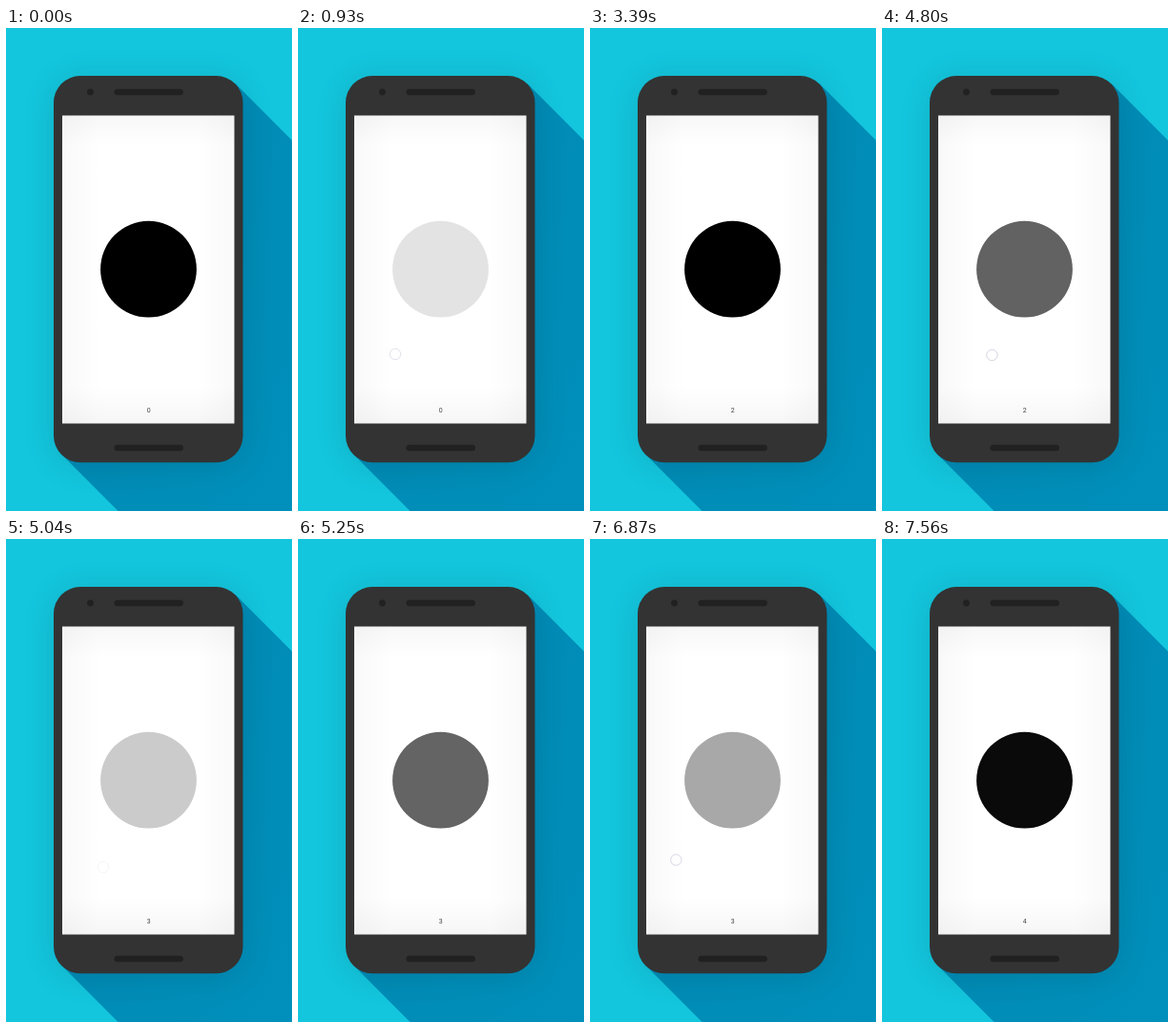
Recreate the animation shown at these times as an HTML page. Size 300x505 px, loop 8.22 s.

```html
<!DOCTYPE html>
<html lang="en">
<head>
<meta charset="utf-8">
<style>
html, body { margin: 0; width: 100%; height: 100%; overflow: hidden; background: #13c6dd; }
svg { display: block; width: 300px; height: 505px; }
text { font: 7px Roboto, sans-serif; text-anchor: middle; fill: #444; }
</style>
</head>
<body>
<svg viewBox="0 0 300 505">
  <defs>
    <linearGradient id="shade" x1="0" y1="0" x2="1" y2="1">
      <stop offset="0" stop-color="#0088b2"/><stop offset="1" stop-color="#0090bb"/>
    </linearGradient>
    <linearGradient id="side">
      <stop offset="0" stop-opacity=".025"/><stop offset=".22" stop-opacity="0"/>
      <stop offset=".78" stop-opacity="0"/><stop offset="1" stop-opacity=".025"/>
    </linearGradient>
    <linearGradient id="ends" x2="0" y2="1">
      <stop offset="0" stop-opacity=".03"/><stop offset=".1" stop-opacity="0"/>
      <stop offset=".88" stop-opacity="0"/><stop offset="1" stop-opacity=".035"/>
    </linearGradient>
    <filter id="soft" x="-40%" y="-30%" width="180%" height="160%"><feGaussianBlur stdDeviation="17"/></filter>
  </defs>
  <rect width="300" height="505" fill="#13c6dd"/>
  <path d="M241 58.5L300 117.5V505H117.5L58 445.5Z" fill="url(#shade)"/>
  <rect x="50" y="53" width="198.5" height="404" rx="28" opacity=".12" filter="url(#soft)"/>
  <rect x="50" y="50" width="198.5" height="404.3" rx="28" fill="#333"/>
  <g fill="#212121">
    <circle cx="88.5" cy="67" r="3.4"/>
    <rect x="113.5" y="63.7" width="72.5" height="6.6" rx="3.3"/>
    <rect x="113.5" y="435.7" width="72.5" height="6.6" rx="3.3"/>
  </g>
  <g>
    <rect x="59" y="91.5" width="180.5" height="322" fill="#fff"/>
    <rect x="59" y="91.5" width="180.5" height="322" fill="url(#side)"/>
    <rect x="59" y="91.5" width="180.5" height="322" fill="url(#ends)"/>
  </g>
  <circle id="dot" cx="149.5" cy="252.2" r="50.4"/>
  <circle id="touch" r="5.7" fill="none" stroke="#d6d5e2"/>
  <text id="count" x="149.7" y="401.8">0</text>
</svg>
<script>
const LOOP = 8220, STEP = 30;
const LIFT = 90, FADE = 240, SETTLE = 620;
const [dot, touch, count] = ['dot', 'touch', 'count'].map(id => document.getElementById(id));

// Finger down, drag start and page turn times, grey level left at rest, path ends
const swipes = [
  { down: 210, start: 450, turn: 950, rest: 119, from: [171, 339], to: [102, 341] },
  { down: 2190, start: 2310, turn: 2760, rest: 0, from: [176.5, 335.8], to: [99, 340] },
  { down: 4320, start: 4440, turn: 4947, rest: 0, from: [182, 337], to: [102, 343] },
  { down: 6240, start: 6360, turn: 6952, rest: 10, from: [188, 333.7], to: [90.3, 335.5] }
];

const clamp = v => Math.min(1, Math.max(0, v));
const mix = (a, b, k) => a + (b - a) * k;

// The dot fades out up to the page turn, then back in to its rest level
function greyAt(t) {
  const s = swipes.findLast(s => t >= s.start);
  if (!s) return 0;
  if (t < s.turn) return 255 * ((t - s.start) / (s.turn - s.start)) ** 2.8;
  return Math.max(s.rest, 255 * clamp(1 - (t - s.turn) / SETTLE) ** 1.4);
}

function draw(t) {
  const g = Math.round(greyAt(t));
  dot.setAttribute('fill', `rgb(${g},${g},${g})`);
  count.textContent = swipes.filter(s => t >= s.turn).length;

  const s = swipes.findLast(s => t >= s.down);
  touch.setAttribute('opacity', s ? clamp(1 - (t - s.turn + LIFT) / FADE) : 0);
  if (!s) return;
  const k = clamp((t - s.start) / (s.turn - LIFT - s.start)) ** 1.25;
  touch.setAttribute('cx', mix(s.from[0], s.to[0], k));
  touch.setAttribute('cy', mix(s.from[1], s.to[1], k));
}

const begin = performance.now();
function tick() {
  const t = (performance.now() - begin) % LOOP;
  draw(Math.floor(t / STEP) * STEP);
  requestAnimationFrame(tick);
}
tick();
</script>
</body>
</html>
```
